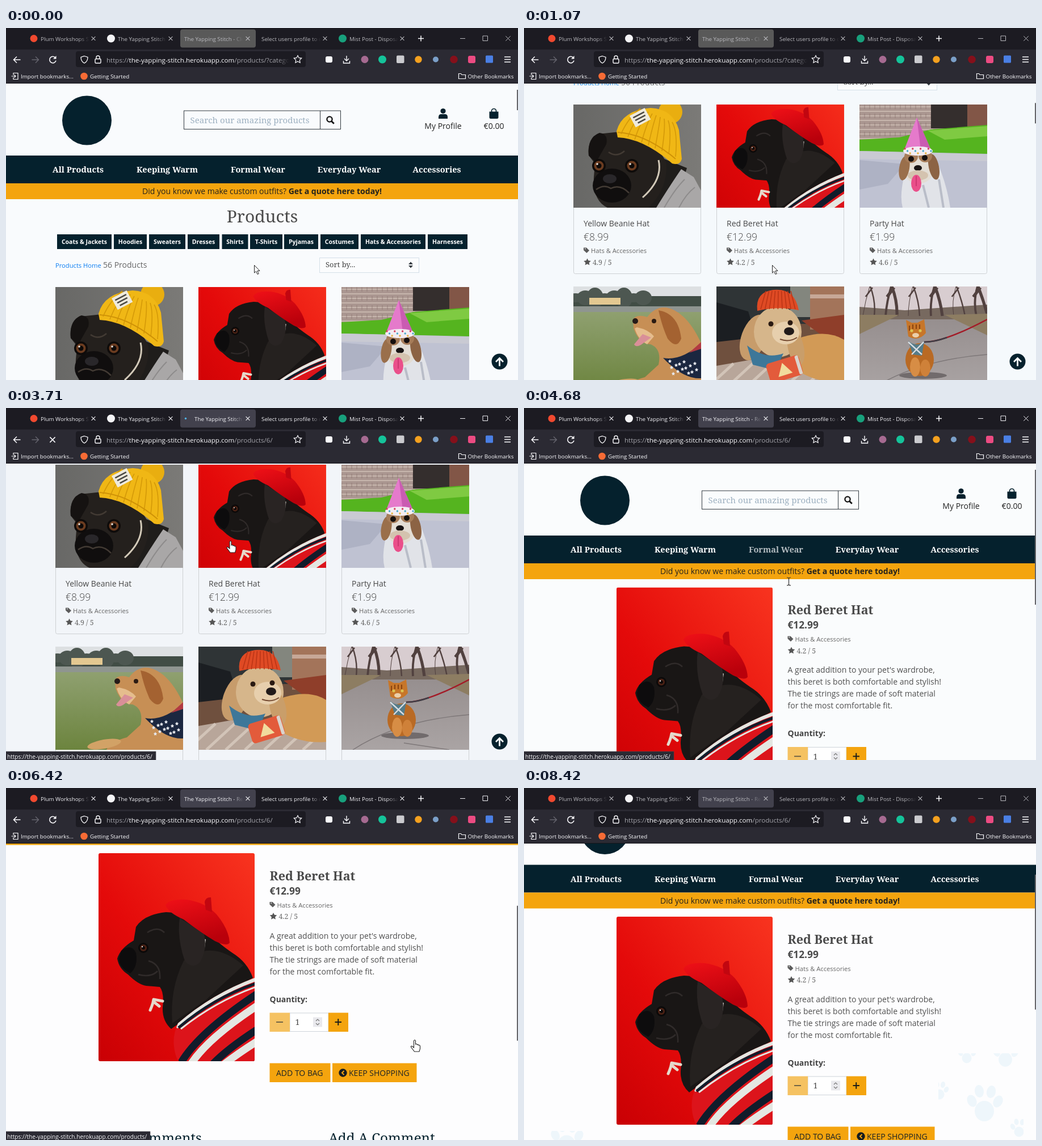
Write an HTML page that moves like this. It is 902 by 621 pixels and loops after 8520 ms.

```html
<!DOCTYPE html>
<html lang="en">
<head>
<meta charset="utf-8">
<title>Pet shop walkthrough</title>
<style>
  html, body { margin: 0; width: 100%; height: 100%; overflow: hidden; background: #1c1b22; }
  svg { display: block; }
  text { font-family: 'Open Sans', 'Noto Sans', sans-serif; white-space: pre; }
  .serif { font-family: 'Noto Serif', serif; }
</style>
</head>
<body>
<svg id="stage" width="902" height="621" viewBox="0 0 902 621"></svg>
<script>
const LOOP = 8520;
const INK = '#05212d', ORANGE = '#f4a40e', LIGHT = '#fbfbfe';
const SITE = 'the-yapping-stitch.herokuapp.com';

// ---- drawing helpers
const text = (x, y, s, size, fill, extra = '') =>
  `<text x="${x}" y="${y}" font-size="${size}" fill="${fill}" ${extra}>${s}</text>`;
const MID = 'text-anchor="middle"', BOLD = 'font-weight="700"', SERIF = 'class="serif"';
const rect = (x, y, w, h, fill, extra = '') =>
  `<rect x="${x}" y="${y}" width="${w}" height="${h}" fill="${fill}" ${extra}/>`;
const circle = (x, y, r, fill, extra = '') => `<circle cx="${x}" cy="${y}" r="${r}" fill="${fill}" ${extra}/>`;
const oval = (x, y, rx, ry, fill, turn = 0) =>
  `<ellipse cx="${x}" cy="${y}" rx="${rx}" ry="${ry}" fill="${fill}" transform="rotate(${turn} ${x} ${y})"/>`;
const shape = (d, fill, extra = '') => `<path d="${d}" fill="${fill}" ${extra}/>`;
const line = (d, stroke, w = 1.4, extra = '') =>
  `<path d="${d}" fill="none" stroke="${stroke}" stroke-width="${w}" ${extra}/>`;
const range = n => Array.from({ length: n }, (_, i) => i);
const repeat = (n, draw) => range(n).map(draw).join('');
const group = (id, body, extra = '') => `<g id="${id}" ${extra}>${body}</g>`;
const windowAt = (x, y, w, h, body) => `<svg x="${x}" y="${y}" width="${w}" height="${h}">${body}</svg>`;
const cross = (x, y, r, color, w = 1.1) =>
  line(`M${x - r},${y - r}l${2 * r},${2 * r}m0,${-2 * r}l${-2 * r},${2 * r}`, color, w);
const gradient = (id, stops, dir) => `<linearGradient id="${id}" ${dir}>` +
  stops.map(([at, c]) => `<stop offset="${at}" stop-color="${c}"/>`).join('') + '</linearGradient>';
const fadeMask = w => gradient('g' + w, [[0, '#fff'], [1, '#000']],
  `gradientUnits="userSpaceOnUse" x1="${w - 20}" x2="${w}"`) +
  `<mask id="fade${w}" maskUnits="userSpaceOnUse" x="0" y="0" width="${w}" height="30">${rect(0, 0, w, 30, `url(#g${w})`)}</mask>`;
const faded = (x, y, w, body) => windowAt(x, y, w, 30, `<g mask="url(#fade${w})">${body}</g>`);

const star = (x, y, r) => {
  const pts = range(10).map(i => {
    const a = i * Math.PI / 5 - Math.PI / 2, q = i % 2 ? r * .5 : r;
    return `${(x + q * Math.cos(a)).toFixed(1)},${(y + q * Math.sin(a)).toFixed(1)}`;
  });
  return 'M' + pts.join('L') + 'Z';
};
const tag = (x, y) => shape(`M${x},${y}h5l5,5-4.6,4.6-5.4-5zm2,1.2v1.6h1.6v-1.6z`, '#5c5c5c', 'fill-rule="evenodd"');
const details = (x, y, rating) => tag(x, y - 9.5) + text(x + 13, y, 'Hats &amp; Accessories', 11.2, '#666') +
  shape(star(x + 6.5, y + 16, 6.6), '#555') + text(x + 16, y + 20.5, rating + ' / 5', 12.3, '#666', SERIF);

// ---- pictures
const pug = () => rect(0, 0, 275, 367, 'url(#red)') +
  shape('M119,104Q80,108 66,130L62,154Q38,168 33,186Q36,204 52,214Q70,232 84,234L108,236Q116,246 113,272Q112,296 128,310L190,266L272,220Q262,192 236,176Q210,158 205,150L150,106Z', '#191615') +
  shape('M150,190Q200,150 255,198L190,258L130,300Q125,240 150,190Z', '#25211f') +
  shape('M40,172Q58,158 66,176Q70,200 56,212Q36,202 36,186Z', '#0d0c0d') +
  line('M86,140Q104,128 116,140M88,190Q110,196 108,222M70,214Q92,220 104,208', '#302b2a', 2.5) +
  shape('M180,150L189,152 187,167 178,172Z', '#d9d6cf') +
  shape('M143,114Q138,150 152,190Q166,206 179,192Q192,170 186,142Z', '#292423') +
  circle(79, 167, 9, '#0b0909') + circle(79, 167, 6, '#4a2114') + circle(79, 167, 3, '#0c0808') + circle(77, 165, 1.2, '#ddd') +
  shape('M118,92Q124,80 155,82Q187,86 208,108Q230,135 231,158Q226,165 205,155Q180,140 150,117Q123,105 118,92Z', 'url(#beret)') +
  shape('M189,100L187,86Q189,77 198,78L200,104Z', '#c20610') +
  line('M91,277Q96,266 97,258L113,261M97,262L107,270', '#e5d9cb', 5, 'stroke-linecap="round" stroke-linejoin="round"') +
  `<g clip-path="url(#shirt)">${rect(110, 210, 165, 160, '#dc141b')}` +
  repeat(9, i => line(`M${140 + i * 18},380Q${168 + i * 18},${320 + i * 9} 292,${240 + i * 21}`,
    ['#111c2b', '#e4e7e2', '#dc141b'][i % 3], 13)) +
  line('M278,221Q200,248 136,306', '#e4e7e2', 9) + line('M280,229Q204,254 141,308', '#111c2b', 5) +
  line('M280,235Q208,260 145,310', '#e4e7e2', 3) + '</g>';

const beanie = () => rect(0, 0, 225, 182, 'url(#grey)') +
  shape('M120,182L160,96L200,112L178,182Z', '#1f1d1b') + shape('M146,182Q172,140 190,114L212,128L225,152V182Z', '#a9a7a7') +
  line('M160,182Q178,150 196,132M186,182Q198,158 214,146', '#8d8b8b', 2) +
  shape('M27,90Q24,62 44,52L82,48Q150,66 164,104Q166,150 132,182H60Q34,170 36,128L38,104Z', '#24201d') +
  shape('M27,90Q24,58 46,50Q62,52 58,70L40,102Z', '#151211') +
  oval(68, 143, 34, 30, '#100e0e') + oval(64, 131, 12, 8, '#29272a') +
  line('M40,150Q54,140 66,148Q82,140 98,156M62,84Q76,94 90,82', '#433b34', 2.5) +
  [[45, 108], [103, 108]].map(([x, y]) => circle(x, y, 12, '#0e0b0a') + circle(x, y, 8.5, '#6b3c20') +
    circle(x, y, 4.5, '#0c0908') + circle(x - 3, y - 3, 1.8, '#e8e4de')).join('') +
  line('M150,98Q158,132 122,164', '#d3cab9', 3) +
  circle(171, 13, 21, '#e9ae10') +
  shape('M76,47Q86,10 136,6Q176,8 186,45L191,96Q188,108 174,104Q124,60 78,58Z', '#f0b715') +
  repeat(9, i => line(`M${84 + i * 12},${52 + i * 5}Q${96 + i * 11},${24 + i * 3} ${118 + i * 7},${7 + i * 3}`, '#d49908', 1.6)) +
  line('M78,49Q128,52 180,96', '#cf9206', 2) +
  `<g transform="rotate(-28 117 24)">${rect(103, 12, 30, 23, '#eeeadd')}${line('M107,18h22m-21,6h20m-18,6h15', '#4b4944', 2.6)}</g>`;

const party = () => rect(0, 0, 225, 182, '#bfc2d2') + rect(0, 0, 225, 62, '#aa9690') +
  repeat(8, i => line(`M0,${4 + i * 8}H130`, '#d0c0b7', 1.5)) + repeat(16, i => line(`M${i * 9},0v60`, '#8d7872', .8, 'stroke-dasharray="8 8"')) +
  rect(126, 0, 68, 42, '#342e2d') + rect(190, 0, 35, 52, '#825647') +
  shape('M0,62L70,58L126,44L225,36V87L0,82Z', '#55b41f') + shape('M120,46L225,38V56L150,62Z', '#7fca42') +
  shape('M0,82L225,88V100L0,96Z', '#c9cad3') + shape('M0,98L80,105L50,140L0,150Z', '#aeb2c4') +
  shape('M80,120Q70,160 76,182H160Q154,142 138,104Z', '#e1e3e8') + shape('M112,142l10,40M140,132l8,50', 'none', 'stroke="#b9bdc8" stroke-width="4"') +
  oval(104, 108, 29, 32, '#e3ddd4') + oval(79, 112, 9, 22, '#9a6f4b', 10) + oval(131, 110, 9, 23, '#8c6344', -12) +
  oval(91, 92, 12, 11, '#a67c59') + oval(116, 91, 12, 11, '#a67c59') +
  circle(91, 96, 5, '#16100e') + circle(115, 94, 5, '#16100e') + oval(103, 112, 7, 5, '#171313') +
  oval(103, 125, 18, 9, '#d4c3af') + oval(100, 139, 9, 15, '#ea4f8a') + line('M100,126v18', '#b92b62', 1.2) +
  shape('M101,23L78,82L126,80Z', '#e57acb') + shape('M101,23L108,80L126,80Z', '#ca5cb2') +
  oval(103, 82, 26, 8, '#f3edf2') + repeat(11, i => circle(80 + i * 4.6, 82 + (i % 3 - 1) * 4, 1.7, ['#d63c5c', '#4aa9ca', '#e8b33b'][i % 3]));

const golden = () => rect(0, 0, 225, 182, '#dde0e2') + rect(0, 17, 225, 20, '#414d45') +
  repeat(8, i => oval(4 + i * 17, 20, 15, 8 + i % 3 * 5, '#4d5751')) + rect(28, 20, 55, 12, '#e3c891') +
  rect(0, 35, 225, 18, '#8f9590') + rect(0, 45, 225, 137, 'url(#grass)') +
  shape('M105,58Q112,48 130,54Q150,28 178,42Q205,56 225,100V182H90Q96,168 126,160L150,138Q156,110 136,102Q116,102 106,74Z', '#c78f55') +
  shape('M150,42Q185,48 190,92Q182,112 166,92Q156,70 150,42Z', '#a46231') +
  shape('M112,72Q132,76 142,88L130,102Q114,94 108,74Z', '#e5bd8d') + shape('M122,84L107,102Q110,108 119,103L137,90Z', '#d98f98') +
  oval(109, 61, 5, 5, '#251b18') + circle(142, 61, 4, '#2b1b13') + oval(86, 172, 30, 8, '#d2a266', -10) +
  shape('M158,126Q190,132 225,100V162Q194,164 158,126Z', '#1b2740') +
  repeat(14, i => shape(star(170 + i * 11 % 52, 132 + i * 7 % 24, 3.4), '#e7e9ee')) + shape('M204,117L225,98V110Z', '#b23a42');

const doodle = () => rect(0, 0, 225, 182, '#6f503e') + rect(0, 0, 225, 66, '#2f3436') + shape('M0,28L56,44L70,90L0,98Z', '#1b1e22') +
  rect(130, 0, 36, 54, '#83867e') + rect(165, 0, 60, 76, '#a3745a') + rect(165, 14, 60, 7, '#c7a897') + shape('M150,60L225,50V115Z', '#8f3e2a') +
  shape('M0,140L80,126L190,154L225,140V182H0Z', '#b8a69a') + repeat(7, i => line(`M${i * 34 - 20},182l50,-46`, '#d2c4b8', 5)) +
  shape('M132,96Q190,72 225,94V168Q180,172 142,148Z', '#d29a56') + oval(66, 90, 22, 42, '#c79c6b', 20) + oval(108, 80, 42, 45, '#d6b68b') +
  oval(140, 108, 14, 32, '#c99e6a', -12) + oval(122, 82, 24, 20, '#e7cfad') +
  circle(96, 66, 4.5, '#2a1a12') + circle(130, 64, 4.5, '#2a1a12') + oval(128, 79, 9, 7, '#211a19') + line('M112,93Q128,99 142,90', '#73482f', 2) +
  shape('M54,104Q86,130 118,118L104,148L64,138Z', '#3d7799') + shape('M72,43Q68,10 100,6Q138,2 145,42Q108,34 72,43Z', '#df4a24') +
  repeat(9, i => line(`M${78 + i * 7.6},40L${87 + i * 5.5},8`, '#b93416', 1.5)) +
  `<g transform="rotate(-17 120 146)">${rect(90, 128, 60, 36, '#e35b3b', 'rx="6"')}${rect(143, 129, 6, 34, '#d9d4cd', 'rx="2"')}${shape('M106,156l13,-22 13,22z', '#f1dc9d')}</g>`;

const cat = () => rect(0, 0, 225, 182, 'url(#road)') + rect(0, 0, 225, 44, '#d8cdd0') + shape('M0,36L80,42L225,32V58L0,58Z', '#77695f') +
  repeat(12, i => line(`M${6 + i * 20},52Q${10 + i * 19},26 ${i % 2 ? i * 19 : 18 + i * 19},0m-8,18l12,-16`, '#51413f', 1 + i % 4 * 1.4)) +
  shape('M0,50L70,50L0,84ZM150,50L225,48V86Z', '#8d7d62') + line('M20,182Q100,130 225,120M110,170L190,182', '#7d7778', 1.4) +
  oval(112, 157, 42, 6, '#716b6c') + oval(106, 129, 25, 29, '#b96a24') + oval(98, 142, 9, 17, '#d78d45') + oval(116, 144, 9, 15, '#cf8139') +
  shape('M82,59L92,64H102L114,58L117,82Q104,98 86,88Z', '#c77629') + line('M88,69v9m6-11v8m6-8v8m6-8v8', '#88430f', 2) +
  circle(92, 78, 2.6, '#dbc352') + circle(107, 78, 2.6, '#dbc352') + oval(99, 86, 6, 4, '#ebcfaa') +
  shape('M86,96Q100,108 114,97L110,122L94,120Z', '#557c89') + line('M86,98L110,120M113,98L92,120', '#d8dde2', 2.4) +
  line('M114,98Q150,98 225,58', '#a31c28', 2.5) + line('M114,98Q132,98 154,90', '#3e3e46', 2.5);

// ---- browser window
const tabTitles = [[61, 'Plum Workshops School', 86], [197, 'The Yapping Stitch', 86], [450, 'Select users profile to comment', 105], [605, 'Mist Post - Disposable', 86]];
const chrome = () => rect(0, 0, 902, 38, '#1c1b22') + rect(0, 38, 902, 60, '#2b2a33') +
  rect(307, 2.5, 133, 32, '#595959', 'rx="4" id="tab"') +
  circle(49, 18.5, 6.5, '#f0492f') + circle(185, 18.5, 7, '#f4f4f6') + circle(593, 18.5, 7, '#18a07c') +
  group('titles', tabTitles.map(([x, s, w]) => faded(x, 8, w, text(0, 14.5, s, 9.8, 'currentColor'))).join('') +
    faded(314, 8, 104, '<text id="title" y="14.5" font-size="9.8" fill="currentColor"></text>') +
    [154, 290, 426, 562, 698].map(x => cross(x, 18.5, 3.4, 'currentColor')).join('') +
    line('M726,18.5h10m-5,-5v10', LIGHT, 1.5) + line('M800,18.5h9m31,-4.5h8.500v8.500h-8.500z', 'currentColor', 1) + cross(884.5, 18.5, 4.2, 'currentColor', 1)) +
  circle(317, 18.5, 1.7, '#52b7f5', 'id="dot"') +
  line('M25.500,56H14M19,50.500L13.500,56L19,61.500', LIGHT, 1.5) + line('M45.500,56H57M52,50.500L57.500,56L52,61.500', '#66656f', 1.4) +
  group('reload', line('M87,52.500A5.700,5.700 0 1 0 88,57.500', LIGHT, 1.6) + shape('M88.500,49v5.500h-5.500z', LIGHT)) +
  group('stop', cross(82, 56, 4.6, LIGHT, 1.5)) +
  rect(123, 41, 405, 28, '#1c1b22', 'rx="4"') +
  line('M138,49.500L144,51.500Q144,59 138,62Q132,59 132,51.500Z', LIGHT, 1.3) +
  rect(157, 54.5, 10, 7.5, 'none', `rx="1.5" stroke="${LIGHT}" stroke-width="1.4"`) + line('M159,54v-2a3,3 0 0 1 6,0v2', LIGHT, 1.4) +
  faded(177, 41, 322, `<text y="19.500" font-size="11.6" fill="#a4a4ab">https://<tspan fill="${LIGHT}">${SITE}</tspan><tspan id="path"></tspan></text>`) +
  line(star(514, 55.5, 7), LIGHT, 1.2) +
  rect(563, 50, 12, 11, LIGHT, 'rx="3"') + line('M600,49v9m-4,-4l4,4 4,-4m-9.500,4v4h11v-4', LIGHT, 1.4) +
  circle(632, 55.5, 6.5, '#a66a91') + circle(663, 55.5, 7, '#15c39a') + rect(688, 48.5, 13.5, 13.5, '#cbcbcf', 'rx="2"') +
  circle(726.5, 55.5, 6.2, '#f5a11f') + circle(757, 55.5, 5, '#7b9fc8') + circle(789, 55.5, 6.8, '#85101b') +
  rect(814, 49, 13, 13, '#ec4b82', 'rx="3"') + rect(845, 48.5, 13, 13, '#4a7fe4', 'rx="1.500"') +
  line('M878,51h11m-11,4.500h11m-11,4.500h11', LIGHT, 1.3) +
  line('M13,83v-3.500h8v11h-8v-3.500M9.500,85h7.500m-2.500,-2.500l2.500,2.500 -2.500,2.500', LIGHT, 1.2) + text(26, 89, 'Import bookmarks...', 9.8, LIGHT) +
  circle(137.500, 85, 6.3, '#f66b35') + text(148, 89, 'Getting Started', 9.8, LIGHT) +
  line('M797.500,89.500v-9h4l1.500,2h6.500v7z', LIGHT, 1.2) + text(813.5, 89, 'Other Bookmarks', 9.8, LIGHT) + rect(0, 97, 902, 1, '#15141a');

// ---- shop pages
const navItems = [[127, 'All Products'], [284, 'Keeping Warm'], [444, 'Formal Wear'], [604.5, 'Everyday Wear'], [759, 'Accessories']];
const header = () => circle(142.5, 163, 43.5, INK) +
  rect(313.5, 146, 276, 32.5, 'none', 'stroke="#333a40"') + line('M553.500,146v32.500', '#333a40', 1) +
  text(324.5, 167.500, 'Search our amazing products', 15, '#9db0c0', SERIF) +
  circle(570, 161, 4.6, 'none', 'stroke="#111" stroke-width="2.3"') + line('M573.500,164.500l4.300,4.300', '#111', 2.8) +
  circle(770, 146.500, 4.6, INK) + shape('M762,160v-3q0,-5 5,-5h6q5,0 5,5v3z', INK) + text(770, 178, 'My Profile', 14, '#222', MID) +
  shape('M851.500,147.500h16v10q0,2.500 -2.500,2.500h-11q-2.500,0 -2.500,-2.500z', INK) + line('M855.500,149v-2.500a4,4 0 0 1 8,0v2.500', INK, 1.7) +
  text(859.5, 178, '€0.00', 14, '#222', MID) +
  rect(0, 225, 902, 49, INK) + navItems.map(([x, s]) => text(x, 255, s, 14.5, '#fff', `${MID} ${BOLD} ${SERIF}${s[0] === 'F' ? ' data-hover="1"' : ''}`)).join('') +
  rect(0, 274, 902, 28, ORANGE) +
  text(240, 293, `Did you know we make custom outfits? <tspan ${BOLD}>Get a quote here today!</tspan>`, 14, '#24221d');

const categories = [[90, 96, 'Coats &amp; Jackets'], [190, 58, 'Hoodies'], [252, 64, 'Sweaters'], [320, 56, 'Dresses'], [380.5, 46, 'Shirts'],
  [430, 57, 'T-Shirts'], [490, 60, 'Pyjamas'], [554, 67, 'Costumes'], [625, 114, 'Hats &amp; Accessories'], [743, 70, 'Harnesses']];
const card = (x, y, picture, name = '', price = '', rating = '') =>
  rect(x + .5, y + .5, 224, 298, 'none', 'rx="3" stroke="#cdd0d3"') + windowAt(x, y, 225, 182, picture) +
  (name && text(x + 18, y + 215, name, 14, '#484848') + text(x + 18, y + 240, price, 17.5, '#484848', 'font-weight="300"') + details(x + 18, y + 262, rating));
const listing = () => text(451.5, 343, 'Products', 29.9, '#4a4a4a', `${MID} ${SERIF}`) +
  categories.map(([x, w, s]) => rect(x, 364, w, 26, INK) + text(x + w / 2, 381, s, 10.5, '#fff', `${MID} ${BOLD}`)).join('') +
  text(87, 423, 'Products Home', 11.2, '#0a7df2') + text(171, 423, '56 Products', 14, '#666') +
  rect(552.5, 405.5, 175, 26, '#fbfcfd', 'stroke="#d4dfe8"') + text(563, 422, 'Sort by...', 13, '#444', SERIF) +
  shape('M709,417l4,-4.500 4,4.500zm0,2l4,4.500 4,-4.500z', '#343a40') +
  card(87, 457, beanie(), 'Yellow Beanie Hat', '€8.99', '4.9') +
  card(339, 457, '<use href="#pug" transform="translate(0 -59) scale(.818)"/>', 'Red Beret Hat', '€12.99', '4.2') +
  card(591, 457, party(), 'Party Hat', '€1.99', '4.6') +
  card(87, 778, golden()) + card(339, 778, doodle()) + card(591, 778, cat());

const blurb = ["A great addition to your pet's wardrobe,", 'this beret is both comfortable and stylish!', 'The tie strings are made of soft material', 'for the most comfortable fit.'];
const product = () => '<g clip-path="url(#photo)"><use href="#pug" x="163" y="316.5"/></g>' +
  text(464.5, 364, 'Red Beret Hat', 21.5, '#4a4a4a', `${BOLD} ${SERIF}`) + text(464.5, 389, '€12.99', 17.3, '#4a4a4a', BOLD) + details(464.5, 412, '4.2') +
  blurb.map((s, i) => text(464.5, 467 + i * 21, s, 14, '#505050')).join('') + text(464.5, 579, 'Quantity:', 14, '#444', BOLD) +
  rect(500, 598.5, 68, 32.5, '#fff', 'stroke="#ced4da"') + rect(464.5, 598, 35.5, 33.5, '#f5c262') + rect(568, 598, 35, 33.5, ORANGE) +
  line('M476,614.500h12', '#5c5440', 1.7) + line('M579.500,614.500h11.500m-5.750,-5.750v11.500', '#1d1d18', 2) +
  text(509.5, 619.5, '1', 14, '#444', SERIF) + rect(541, 606, 16, 17, '#e9e9ed') + line('M546,612.500l3,-3 3,3m-6,4l3,3 3,-3', '#777', 1.2) +
  rect(464.5, 687, 107, 33.5, ORANGE) + rect(575, 687, 148.5, 33.5, ORANGE) + text(476, 709, 'ADD TO BAG', 14, '#1c2326') +
  circle(593.5, 704, 7.2, '#151c20') + line('M595.500,700.500l-3.500,3.500 3.500,3.500', ORANGE, 2) + text(604, 709, 'KEEP SHOPPING', 14, '#1c2326') +
  text(345, 827, 'Product Comments', 24.2, INK, `text-anchor="end" ${SERIF}`) + text(662, 827, 'Add A Comment', 24.2, INK, `${MID} ${SERIF}`);

const pawPrint = (x, y, s = 1) => [[-22, -5, 8, 11, -25], [-9, -22, 8, 11, -8], [12, -21, 8, 11, 12], [24, -4, 8, 11, 28], [0, 13, 17, 18, 0]]
  .map(([dx, dy, rx, ry, turn]) => oval(x + dx * s, y + dy * s, rx * s, ry * s, '#eef6fb', turn)).join('');
const paws = () => windowAt(730, 468, 150, 153, pawPrint(81, 89) + pawPrint(2, 66, .5) + pawPrint(118, 2, .7) + pawPrint(50, 2, .5) + pawPrint(142, 132, .5)) +
  windowAt(0, 605, 255, 16, pawPrint(75, 12, .9));

const cursors = () => group('arrow', shape('M.5,.5V14L3.600,11.200L6,16.500L8.200,15.500L5.900,10.400H10Z', '#fff', 'stroke="#222" stroke-width="1"')) +
  group('hand', shape('M0,2Q1.500,-1 3,2V8Q5.500,6.500 6,9Q8,7.500 8.500,10Q11,9 11,12V16L9.500,21H1L-5,13Q-5.500,10.500 -3,11.500L0,14Z', '#fff', 'stroke="#222" stroke-width="1.1"')) +
  group('beam', line('M-3.500,-7q3,0 3.500,1.500q.5,-1.500 3.500,-1.500M0,-6v12m-3.500,1q3,0 3.500,-1.500q.5,1.500 3.500,1.500', '#333', 1.2));

document.getElementById('stage').innerHTML = `<defs>
  ${gradient('red', [[0, '#c90004'], [.42, '#e40a0a'], [1, '#f8341f']], 'x1="0" y1="1" x2="1" y2="0"')}
  ${gradient('beret', [[0, '#ef1017'], [1, '#b9000b']], 'x2=".4" y2="1"')}${gradient('grey', [[0, '#686866'], [1, '#7b7a77']], 'x2="1"')}
  ${gradient('grass', [[0, '#8fa070'], [1, '#6c843e']], 'x2="0" y2="1"')}${gradient('road', [[0, '#8d8585'], [1, '#aaa4a4']], 'x2="0" y2="1"')}
  ${[86, 104, 105, 322].map(fadeMask).join('')}
  <clipPath id="shirt"><path d="M275,220Q200,248 140,300Q126,330 138,362L142,367H275Z"/></clipPath>
  <clipPath id="photo">${rect(163, 316.5, 275, 367, '#000', 'rx="3"')}</clipPath>
  ${group('pug', pug())}</defs>` +
  rect(0, 98, 902, 523, '#fafcfd', 'id="paper"') + group('paws', paws()) +
  group('page', header() + group('listing', listing()) + group('product', product())) +
  group('toTop', circle(869.5, 588.5, 14, INK) + line('M869.500,596.500v-14m-6.500,6.500l6.500,-6.500 6.500,6.500', '#fff', 2.8)) +
  rect(900, 109, 2, 36, '#66666a', 'id="thumb"') +
  group('status', rect(0, 606, 264, 15, '#2b2a33', 'id="statusBox" stroke="#4a4952" stroke-width=".6"') + text(2, 619, '', 10.15, LIGHT, 'id="statusText"')) +
  chrome() + group('cursor', cursors());

// ---- timeline: each row holds from its time until the next
const scrolls = [[0, 0], [670, 80], [800, 180], [950, 235], [1070, 322], [1220, 357], [3980, 0], [4950, 12], [5070, 45], [5190, 75], [5310, 89],
  [5460, 130], [5610, 178.5], [5730, 235], [5850, 267], [6420, 201.5], [6570, 178], [6690, 122], [6810, 89.5]];
const pointer = [[0, 437, 418, 'arrow'], [2290, 451, 416, 'arrow'], [2410, 447, 382, 'arrow'], [2530, 430, 322, 'hand'], [2650, 408, 264, 'hand'],
  [2770, 393, 236, 'hand'], [2920, 394, 234, 'hand'], [4680, 466.5, 306, 'beam'], [4800, 677, 432, 'arrow'], [4950, 717, 445.5, 'arrow'],
  [6150, 718.5, 444, 'hand'], [6960, 717, 445.5, 'arrow'], [7640, 729, 467, 'arrow'], [7780, 758, 502, 'arrow'], [7900, 798, 546, 'arrow'], [8020, 850, 598, 'arrow'], [8140, 0, 0, '']];
const papers = [[0, '#f9fbfd'], [670, '#f5f9fc'], [1220, '#f2f5f9'], [3980, '#fafcfd'], [5460, '#fdfdfe']];
const at = (rows, t) => rows.filter(row => row[0] <= t).pop();
const during = (t, a, b) => t >= a && t < b;

const $ = Object.fromEntries([...document.querySelectorAll('#stage [id]')].map(el => [el.id, el]));
const show = (id, on) => $[id].style.display = on ? '' : 'none';
const set = (id, name, value) => $[id].setAttribute(name, value);
const hoverItem = document.querySelector('[data-hover]');

function render(t) {
  const scroll = at(scrolls, t)[1], [, x, y, kind] = at(pointer, t);
  const onProduct = t >= 3980, loading = during(t, 3190, 4400), focused = during(t, 3070, 8420);

  set('page', 'transform', `translate(0 ${-scroll})`);
  set('paper', 'fill', at(papers, t)[1]);
  show('listing', !onProduct);
  show('toTop', !onProduct);
  show('product', onProduct);
  show('paws', t >= 7780);
  hoverItem.setAttribute('fill', during(t, 4680, 4800) ? '#b4bcc1' : '#fff');

  set('thumb', 'y', 109 + scroll * (onProduct ? .49 : .0725));
  set('thumb', 'height', onProduct ? 238 : 36);
  show('thumb', !during(t, 520, 670) && !during(t, 2770, 3980));
  set('thumb', 'opacity', during(t, 400, 520) || during(t, 2650, 2770) ? .5 : 1);

  show('status', during(t, 3070, 4950) || during(t, 6150, 7230));
  set('status', 'opacity', during(t, 7080, 7230) ? .35 : during(t, 6960, 7080) ? .7 : 1);
  set('statusBox', 'width', t < 6000 ? 264 : 254);
  $.statusText.textContent = `https://${SITE}/products/${t < 6000 ? '6/' : ''}`;

  set('tab', 'fill', t < 3070 ? '#595959' : '#42414d');
  set('titles', 'color', focused ? '#f2f2f6' : '#b9b9be');
  set('title', 'x', loading ? 18 : 0);
  $.title.textContent = 'The Yapping Stitch - ' + (t < 3980 ? 'Clothing' : 'Red Beret Hat');
  $.path.textContent = t < 3190 ? '/products/?category=hats' : '/products/6/';
  show('dot', loading);
  set('dot', 'cx', 320 - 4 * Math.cos(t / 120));
  show('stop', loading);
  show('reload', !loading);

  set('cursor', 'transform', `translate(${x} ${y})`);
  ['arrow', 'hand', 'beam'].forEach(name => show(name, name === kind));
}

const start = performance.now();
function tick() {
  render((performance.now() - start) % LOOP);
  requestAnimationFrame(tick);
}
tick();
</script>
</body>
</html>
```
